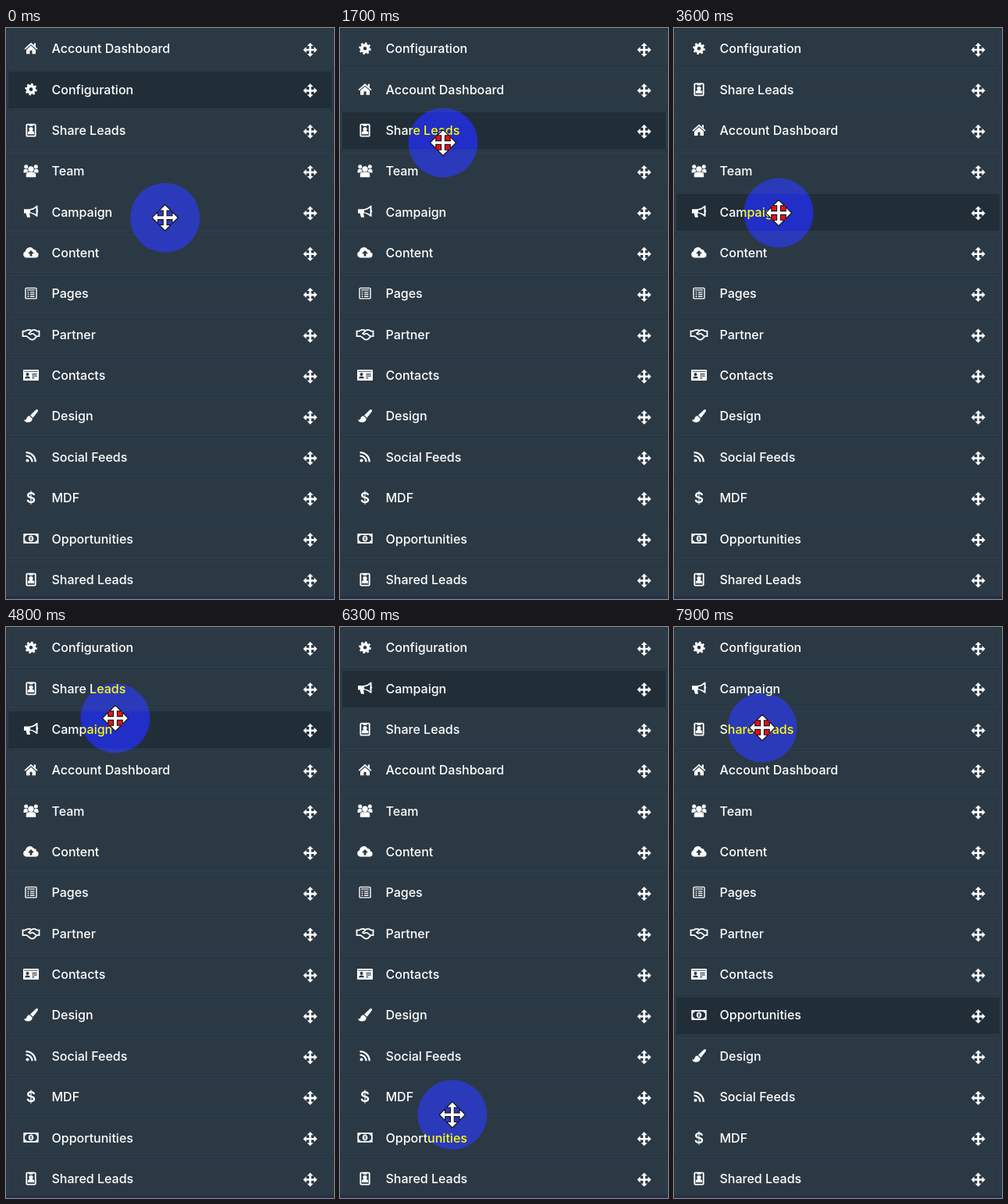
An HTML page that plays this animation: 420 px wide and 732 px high, repeating every 8000 ms.

```html
<!DOCTYPE html>
<html lang="en">
<head>
<meta charset="utf-8">
<title>Sortable menu</title>
<style>
html, body { margin: 0; width: 100%; height: 100%; overflow: hidden; background: #2a3743; }
svg { display: block; width: 420px; height: 732px; isolation: isolate; }
text { font: 500 16px Inter, "Open Sans", sans-serif; fill: #fff; }
.box { fill: #2b3944; stroke: #2d4150; }
.box.on { fill: #212e38; stroke: #2b414f; }
.icon { fill: #fff; fill-rule: evenodd; }
.line { fill: none; stroke: #fff; }
#spot { fill: #00f; mix-blend-mode: difference; }
#press { fill: #e0101c; }
#arrow { fill: #fff; stroke: #111; stroke-width: .6; }
</style>
</head>
<body>
<svg viewBox="0 0 420 732">
  <defs>
    <path id="move" d="M0-9 4-5H1.3V-1.3H5V-4L9 0 5 4V1.3H1.3V5H4L0 9-4 5H-1.3V1.3H-5V4L-9 0-5-4V-1.3H-1.3V-5H-4Z"/>
    <path id="home" d="M0-7.5 8.5.2 7.4 1.5 0-5-7.4 1.5-8.5.2ZM-6 1.6 0-3.7 6 1.6V7H1.5V2.5h-3V7H-6ZM3.8-6.8H6v4.4L3.8-4.4Z"/>
    <g id="cog" class="line">
      <circle r="4.2" stroke-width="3.8"/>
      <circle r="6.6" stroke-width="2.4" pathLength="16" stroke-dasharray="1 1"/>
    </g>
    <g id="badge">
      <rect class="line" x="-5.7" y="-7.3" width="11.4" height="15" rx="1"/>
      <path d="M-2.5-7.5h5v2.3h-5ZM-4.2 5.2V3.6Q-4.2.8 0 .8T4.2 3.6V5.2Z"/>
      <circle cy="-1.4" r="2.6"/>
    </g>
    <g id="team">
      <circle cy="-2.5" r="3.7"/><circle cx="-6.3" cy="-5.7" r="2.5"/><circle cx="6.3" cy="-5.7" r="2.5"/>
      <path id="side" d="M-9.5 2.2V0Q-9.5-2.6-7.5-2.6H-4.8Q-4.5-.6-3.2.6-5 .6-6 2.2Z"/>
      <use href="#side" transform="scale(-1 1)"/>
      <path d="M-6.2 8V5Q-6.2 1.5-3 1.5H3Q6.2 1.5 6.2 5V8Z"/>
    </g>
    <path id="horn" d="M-9-3.5h6Q3-4 7-8h1.5v5.3q1.6 1.7 0 3.4V6H7Q3 2-2 1.8L-1 7h-4L-6.5 1.8H-9ZM6.5-5.2Q3.5-2.5-1-2.2V.6Q3.5 1 6.5 3.4Z"/>
    <path id="cloud" d="M-6 6.5A4.3 4.3 0 0 1-7-1.8 5.6 5.6 0 0 1 3.5-4 3.6 3.6 0 0 1 7-.9 3.8 3.8 0 0 1 6 6.5ZM0-3-4 1.3h2.6v3.2h2.8V1.3H4Z"/>
    <g id="page" class="line">
      <rect x="-7" y="-7" width="14" height="13.5" rx="1" stroke-width="1.4"/>
      <path stroke-width="1.3" d="M-5-4.5H5M-4.5-1.5h2M-1-1.5h5.5M-4.5 1h2M-1 1h5.5M-4.5 3.6h2M-1 3.6h5.5"/>
    </g>
    <path id="shake" class="line" d="M-10.5-4.2h3l3-1.4h3.5l1.5 1 2-1h2.7l2.5 1.4h2.8v6.6H7.7L4 6Q2 7.6-.6 6.3l-5-3.9h-4.9ZM.8-4.6-3-1.2Q-1.5 1 .9-.9h1.8L7 2.6"/>
    <path id="card" d="M-8.8-7H8.8q1.2 0 1.2 1.2V5.8Q10 7 8.8 7H-8.8Q-10 7-10 5.8V-5.8Q-10-7-8.8-7ZM-8.5-5.2v.8h17v-.8ZM-4.5-3a2 2 0 1 0 .01 0ZM-7.6 4.2h6.2V3Q-1.4 1.4-4.5 1.4T-7.6 3ZM1.3-2.2v1.3h6.4v-1.3ZM1.3.4v1.3h6.4V.4ZM1.3 3v1.2h3V3Z"/>
    <path id="brush" d="M8.5-8.3Q9.6-7.2 8.5-5.5L2.5 2.3-1-1 6-7.8Q7.5-9 8.5-8.3ZM-1.8-.2 1.8 3.2Q1.5 8-4 8-8 8-9 4.5-6.5 5.5-5.8 3.5-5 0-1.8-.2Z"/>
    <g id="feed">
      <circle cx="-4.5" cy="4.6" r="2"/>
      <path class="line" stroke-width="2.3" d="M-6.5-1.5A8 8 0 0 1 1.5 6.5M-6.5-5.7A12.2 12.2 0 0 1 5.7 6.5"/>
    </g>
    <text id="dollar" text-anchor="middle" y="7" style="font-size:19px;font-weight:600">$</text>
    <g id="money">
      <rect class="line" x="-8.8" y="-5.4" width="17.6" height="10.8"/>
      <path d="M-8-5h3.5L-8-2ZM8-5H4.5L8-2ZM-8 5h3.5L-8 2ZM8 5H4.5L8 2ZM0-4a3.3 4 0 1 0 .01 0ZM-.7-2.2h1.4v4.4H-.7Z"/>
    </g>
  </defs>
  <rect width="420" height="732" fill="#2a3743"/>
  <g id="boxes"></g>
  <g id="items" stroke-width="1.8"></g>
  <rect y="728.5" width="420" height="3.5" fill="#262e4b"/>
  <circle id="spot" r="44.5"/>
  <g id="cursor">
    <rect id="press" x="-9.5" y="-9.5" width="19" height="19"/>
    <use id="arrow" href="#move" transform="scale(1.85)"/>
  </g>
</svg>
<script>
const LOOP = 8000, STEP = 100, LAG = 300, TOP = 27, PITCH = 52.35;
const menu = [
  ["home", "Account Dashboard"], ["cog", "Configuration"], ["badge", "Share Leads"],
  ["team", "Team"], ["horn", "Campaign"], ["cloud", "Content"], ["page", "Pages"],
  ["shake", "Partner"], ["card", "Contacts"], ["brush", "Design"], ["feed", "Social Feeds"],
  ["dollar", "MDF"], ["money", "Opportunities"], ["badge", "Shared Leads"]
];
// Cursor rests: arrive, leave, x, y
const stops = [
  [-LAG, -260, 170, 75], [400, 400, 268, 565], [900, 900, 134, 78], [1100, 1100, 130, 34],
  [1500, 1700, 132, 147], [2100, 2100, 132, 100], [2900, 3600, 134, 237],
  [4400, 4800, 140, 117], [5200, 6000, 141, 67], [6350, 7430, 144, 658], [7900, LOOP, 113, 129]
];
// Button held: from, to
const drags = [[900, 1100], [1700, 2100], [3600, 5200], [7430, LOOP]];

const el = id => document.getElementById(id);
const rowY = i => TOP + i * PITCH;
const ease = k => k * k * (3 - 2 * k);

el("boxes").innerHTML = menu.map((_, i) =>
  `<rect class="box" x="2.5" y="${rowY(i) - 24.3}" width="415" height="48.8" rx="2"/>`).join("");
el("items").innerHTML = menu.map(([icon, label]) =>
  `<g><use class="icon" href="#${icon}" x="32" y="-.7"/><text x="58.5" y="5.3">${label}</text>
   <use class="icon" href="#move" x="389.5" y="1"/></g>`).join("");
const boxes = [...el("boxes").children], items = [...el("items").children];

function cursorAt(t) {
  const i = stops.findLastIndex(s => s[0] <= t);
  const [, leave, x, y] = stops[i];
  if (t <= leave) return [x, y];
  const [arrive, , nextX, nextY] = stops[i + 1];
  const k = ease((t - leave) / (arrive - leave));
  return [x + (nextX - x) * k, y + (nextY - y) * k];
}

const rowAt = t => Math.round((cursorAt(t)[1] - TOP) / PITCH);

function orderAt(t) {
  const order = items.slice();
  for (const [from, to] of drags)
    if (t > from) order.splice(rowAt(Math.min(t, to)), 0, order.splice(rowAt(from), 1)[0]);
  return order;
}

// The list follows the cursor with a delay.
function draw(t) {
  const late = t - LAG, active = rowAt(late);
  boxes.forEach((box, i) => box.classList.toggle("on", i === active));
  orderAt(late).forEach((item, i) => item.setAttribute("transform", `translate(0 ${rowY(i)})`));
  const at = `translate(${cursorAt(t)})`;
  el("spot").setAttribute("transform", at);
  el("cursor").setAttribute("transform", at);
  const held = drags.some(([from, to]) => t >= from && t < to);
  el("press").setAttribute("visibility", held ? "visible" : "hidden");
}

const start = performance.now();
function tick() {
  const t = (performance.now() - start) % LOOP;
  draw(Math.floor(t / STEP) * STEP);
  requestAnimationFrame(tick);
}
tick();
</script>
</body>
</html>
```
